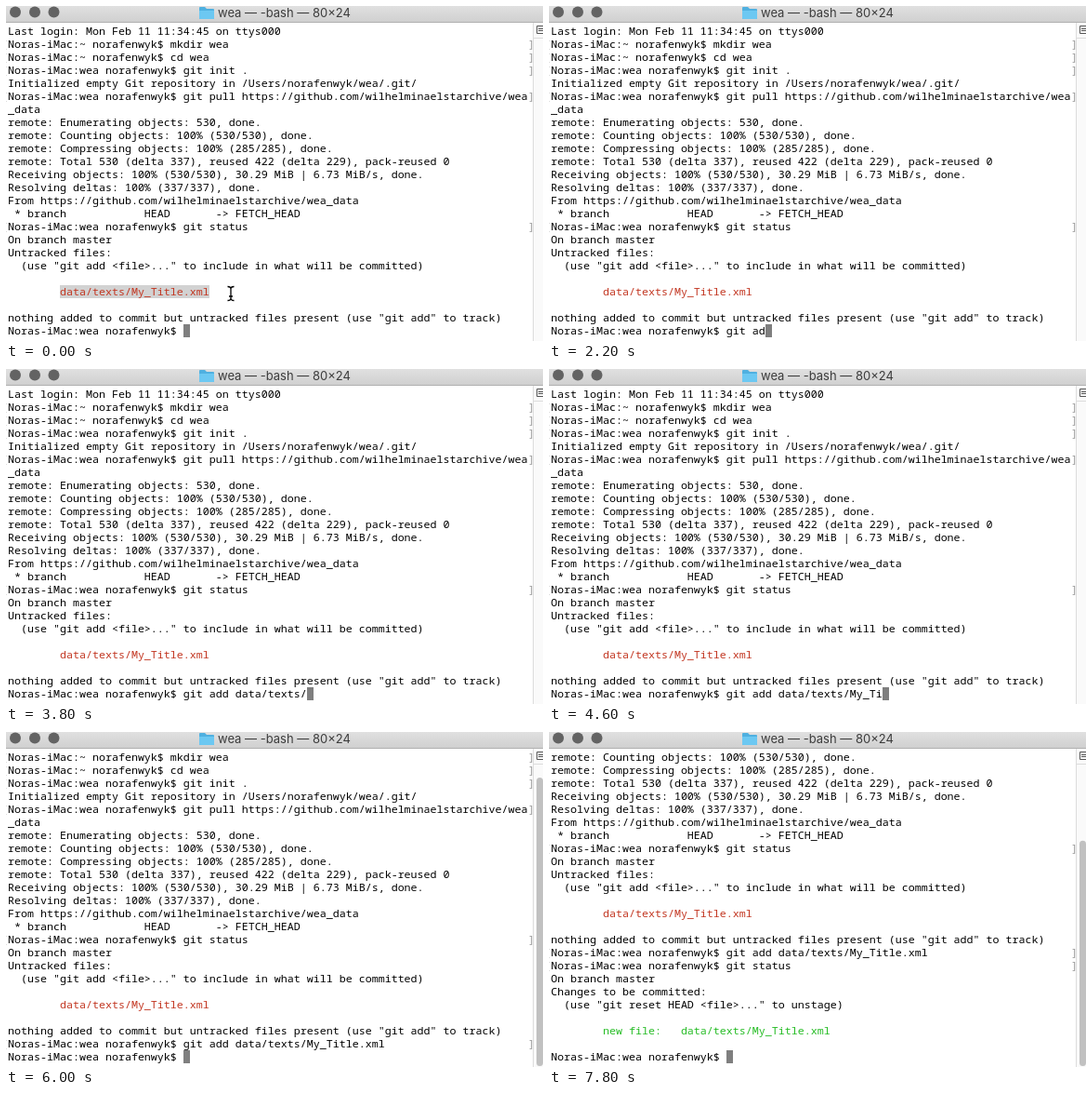
An HTML page for the animation above (8.4 s loop, 578 by 360 pixels).

```html
<!DOCTYPE html>
<html lang="en">
<head>
<meta charset="utf-8">
<title>Terminal session</title>
<style>
  html, body { margin: 0; width: 100%; height: 100%; overflow: hidden; background: #fff; }
  svg { display: block; width: 578px; height: 360px; }
  text { white-space: pre; }
  #screen { font: 500 11.667px "Noto Sans Mono", "DejaVu Sans Mono", monospace; fill: #000; }
  #screen .mark { fill: #999; }
  #screen .red { fill: #c23621; }
  #screen .green { fill: #25bc24; }
  .title { font: 13px Inter, Roboto, sans-serif; fill: #3c3c3c; }
</style>
</head>
<body>
<svg viewBox="0 0 578 360">
  <defs>
    <linearGradient id="bar" x2="0" y2="1">
      <stop stop-color="#e0e0e0"/>
      <stop offset="1" stop-color="#d0d0d0"/>
    </linearGradient>
  </defs>
  <rect width="578" height="360" fill="#fff"/>
  <rect id="selection" x="58" y="300" width="161" height="14" fill="#d2d2d2"/>
  <rect id="cursor" y="342" width="7" height="14" fill="#7f7f7f"/>
  <g id="screen"></g>

  <rect x="567" y="18" width="11" height="342" fill="#fafafa"/>
  <path d="M567.5 18V360M568 34.5H578" stroke="#dcdcdc"/>
  <path d="M579 21.5H571.5V29.5H579M573 24.5H578M573 26.5H578" fill="none" stroke="#555"/>
  <rect id="thumb" x="571" width="7" rx="3.5" fill="#c1c1c1"/>

  <rect width="578" height="17" fill="url(#bar)"/>
  <path d="M0 17.5H578" stroke="#b0b0b0"/>
  <g fill="#636363">
    <circle cx="10" cy="6.5" r="6"/>
    <circle cx="31" cy="6.5" r="6"/>
    <circle cx="51.5" cy="6.5" r="6"/>
  </g>
  <path d="M208 2q0-1 1-1h5l2 2h7q1 0 1 1v9q0 1-1 1h-14q-1 0-1-1z" fill="#4fb0e0"/>
  <path d="M208 5h16v8q0 1-1 1h-14q-1 0-1-1z" fill="#6cc8f2"/>
  <text class="title" x="228" y="12">wea — -bash — 80×24</text>

  <path id="pointer" d="M-3.5-7.5Q0-7.5 0-5Q0-7.5 3.5-7.5M0-5V5M-3.5 7.5Q0 7.5 0 5Q0 7.5 3.5 7.5M-2 3H2"
        fill="none" stroke="#000" stroke-width="1.3"/>
</svg>
<script>
const LOOP = 8400, STEP = 200, CELL = 7, ROW = 14, LEFT = 2, TOP = 20, ROWS = 24;
const HOST = 'Noras-iMac', USER = 'norafenwyk';
const REPO = 'https://github.com/wilhelminaelstarchive/wea';
const FILE = 'data/texts/My_Title.xml';
const ADD = 'git add ' + FILE, STATUS = 'git status';

const prompt = (dir, command = '') => ({ text: `${HOST}:${dir} ${USER}$ ${command}`, prompt: true });
const tinted = (text, tint) => ({ text: ' '.repeat(8) + text, tint });

const lines = [
  'Last login: Mon Feb 11 11:34:45 on ttys000',
  prompt('~', 'mkdir wea'),
  prompt('~', 'cd wea'),
  prompt('wea', 'git init .'),
  `Initialized empty Git repository in /Users/${USER}/wea/.git/`,
  prompt('wea', 'git pull ' + REPO),
  '_data',
  'remote: Enumerating objects: 530, done.',
  'remote: Counting objects: 100% (530/530), done.',
  'remote: Compressing objects: 100% (285/285), done.',
  'remote: Total 530 (delta 337), reused 422 (delta 229), pack-reused 0',
  'Receiving objects: 100% (530/530), 30.29 MiB | 6.73 MiB/s, done.',
  'Resolving deltas: 100% (337/337), done.',
  `From ${REPO}_data`,
  ' * branch            HEAD       -> FETCH_HEAD',
  prompt('wea', STATUS),
  'On branch master',
  'Untracked files:',
  '  (use "git add <file>..." to include in what will be committed)',
  '',
  tinted(FILE, 'red'),
  '',
  'nothing added to commit but untracked files present (use "git add" to track)',
  prompt('wea', ADD),
  prompt('wea', STATUS),
  'On branch master',
  'Changes to be committed:',
  '  (use "git reset HEAD <file>..." to unstage)',
  '',
  tinted('new file:   ' + FILE, 'green'),
  '',
  prompt('wea')
].map(line => typeof line === 'string' ? { text: line } : line);

// Typing bursts: start time, characters before, characters after, steps
const addBursts = [[1600, 0, 10, 6], [2800, 10, 19, 6], [4000, 19, 21, 1], [4400, 21, 31, 6]];
const statusBursts = [[6600, 0, 10, 6]];
const pointerPath = [[242, 309], [256, 315], [276, 324], [297, 331], [292, 331], [287, 331]];

const $ = id => document.getElementById(id);
const set = (node, attrs) => {
  for (const name in attrs) node.setAttribute(name, attrs[name]);
};
const show = (node, visible) => { node.style.display = visible ? '' : 'none'; };

function addText(parent, x, y, text, className) {
  const node = document.createElementNS('http://www.w3.org/2000/svg', 'text');
  set(node, { x, y, class: className });
  node.textContent = text;
  return parent.appendChild(node);
}

lines.forEach((line, i) => {
  const y = TOP + i * ROW + 11;
  line.node = addText($('screen'), LEFT, y, line.text, line.tint || '');
  line.marks = line.prompt
    ? [-1, 80].map(column => addText($('screen'), LEFT + column * CELL, y, ']['[+(column < 0)], 'mark'))
    : [];
});

function typedCount(t, bursts) {
  let count = 0;
  for (const [start, from, to, steps] of bursts) {
    if (t < start) break;
    const k = Math.min(steps, Math.floor((t - start) / STEP) + 1);
    count = from + Math.floor((to - from) * k / steps);
  }
  return count;
}

function draw(t) {
  const last = t < 6000 ? 23 : t < 7800 ? 24 : 31;
  const scroll = last - ROWS + 1;
  const typed = last === 23 ? typedCount(t, addBursts) : last === 24 ? typedCount(t, statusBursts) : 0;
  const column = prompt('wea').text.length + typed;

  lines.forEach((line, i) => {
    const visible = i >= scroll && i <= last;
    show(line.node, visible);
    line.node.textContent = i === last ? line.text.slice(0, column) : line.text;
    line.marks.forEach(mark => show(mark, visible && i < last));
  });
  set($('screen'), { transform: `translate(0 ${-scroll * ROW})` });
  set($('cursor'), { x: LEFT + column * CELL });

  const track = 323, hidden = track * scroll / (last + 1);
  show($('thumb'), scroll > 0);
  set($('thumb'), { y: 36 + hidden, height: track - hidden });

  const [x, y] = pointerPath[Math.min(pointerPath.length - 1, Math.floor(t / STEP))];
  set($('pointer'), { transform: `translate(${x} ${y})` });
  show($('pointer'), t < 1600);
  show($('selection'), t < 800);
}

const begin = performance.now();
let drawn = -1;
function tick() {
  const t = Math.floor((performance.now() - begin) % LOOP / STEP) * STEP;
  if (t !== drawn) draw(drawn = t);
  requestAnimationFrame(tick);
}
tick();
</script>
</body>
</html>
```
